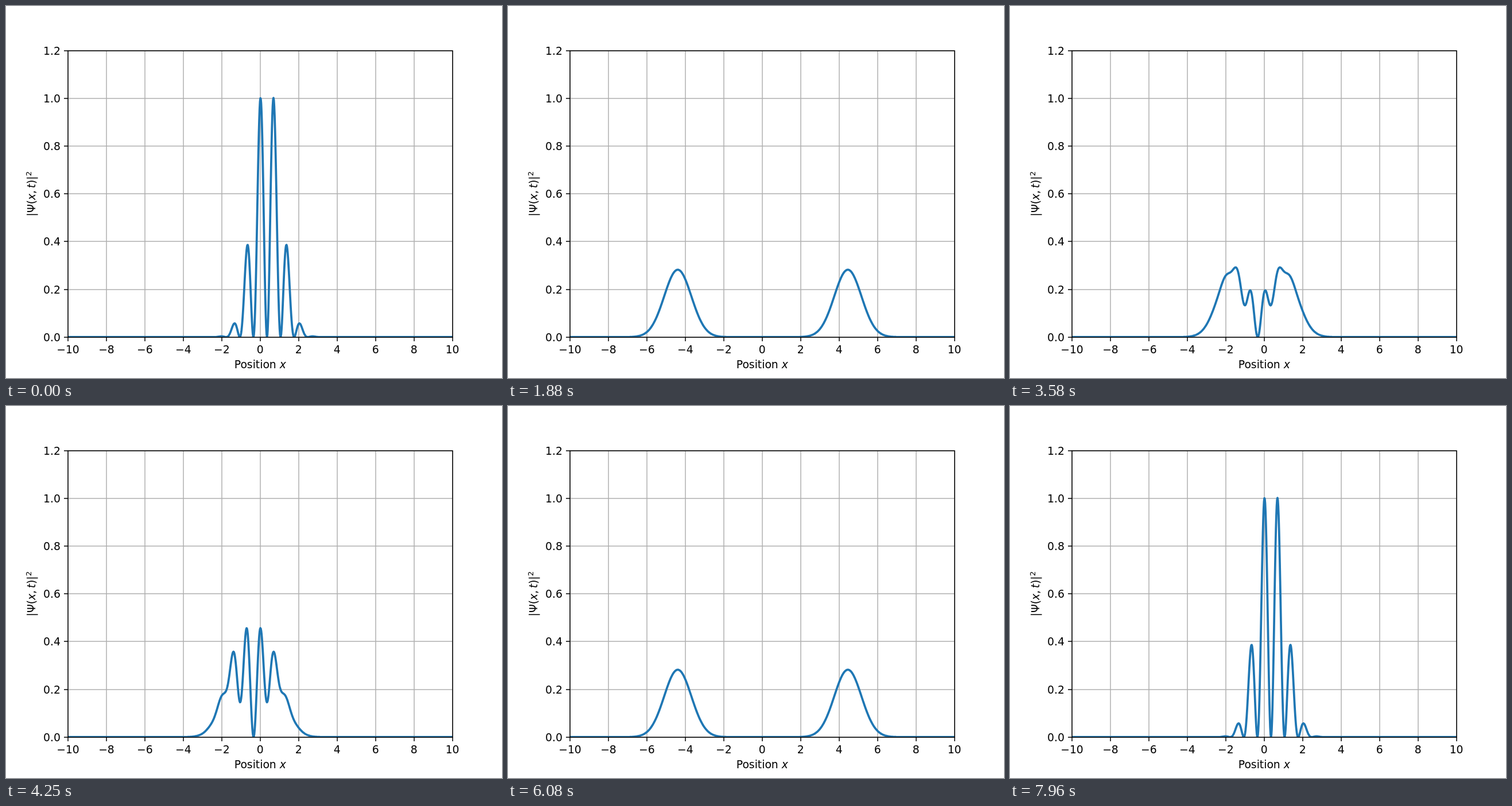
Write an HTML page that moves like this. It is 864 px wide and 648 px high and loops after 8000 ms.

```html
<!DOCTYPE html>
<html lang="en">
<head>
<meta charset="utf-8">
<title>Interfering wave packets</title>
<style>
  html, body { margin: 0; width: 100%; height: 100%; overflow: hidden; background: #fff; }
  svg { display: block; }
  text { font: 18.75px "DejaVu Sans", sans-serif; white-space: pre; }
  .mid { text-anchor: middle; }
  .end { text-anchor: end; }
  .it { font-style: italic; }
  path, rect { fill: none; stroke-width: 1.5; stroke: #000; }
  #grid { stroke: #b0b0b0; }
  #curve { stroke: #1f77b4; stroke-width: 3.75; stroke-linejoin: round; stroke-linecap: square; }
</style>
</head>
<body>
<svg width="864" height="648" viewBox="0 0 864 648">
  <clipPath id="area"><path d="M108 78H778V577H108Z"/></clipPath>
  <path id="grid"/>
  <path id="curve" clip-path="url(#area)"/>
  <path id="ticks"/>
  <rect x="108" y="78" width="670" height="499"/>
  <g id="labels"></g>
  <text class="mid" x="442.8" y="631">Position <tspan class="it">x</tspan></text>
  <text class="mid" transform="translate(51 327.2) rotate(-90)">|Ψ(<tspan class="it">x</tspan>,<tspan class="it" dx="3.65">t</tspan>)|<tspan dy="-7.2" font-size="13.125" style="font-size:13.125px">2</tspan></text>
</svg>
<script>
const el = id => document.getElementById(id);
const px = x => 442.8 + x * 33.48;
const py = y => 576.72 - y * 415.8;

let grid = '', ticks = '', labels = '';
for (let v = -10; v <= 10; v += 2) {
  const x = Math.round(px(v));
  grid += `M${x} 78V577`;
  ticks += `M${x} 577v7`;
  labels += `<text class="mid" x="${px(v)}" y="605">${String(v).replace('-', '\u2212')}</text>`;
}
for (let i = 0; i <= 6; i++) {
  const y = Math.round(py(i / 5));
  grid += `M108 ${y}H778`;
  ticks += `M108 ${y}h-7`;
  labels += `<text class="end" x="94.9" y="${y + 7}">${(i / 5).toFixed(1)}</text>`;
}
el('grid').setAttribute('d', grid);
el('ticks').setAttribute('d', ticks);
el('labels').innerHTML = labels;

// Two coherent oscillator states, alpha = 1/4 ± iπ, in an odd superposition
const STEPS = 192, POINTS = 1000;
function density(x, phase) {
  const u = x - Math.SQRT2 / 4 * Math.cos(phase);
  const d = Math.SQRT2 * Math.PI * Math.sin(phase);
  const k = 2 * Math.SQRT2 * Math.PI * Math.cos(phase);
  const fringe = 2 * Math.exp(-u * u - d * d) * Math.cos(k * u);
  return (Math.exp(-((u - d) ** 2)) + Math.exp(-((u + d) ** 2)) - fringe) / (2 * Math.sqrt(Math.PI));
}

let shown = -1;
function draw() {
  // 24 steps per second, each starting on a rounded hundredth
  const hundredths = Math.floor(performance.now() % 8000 / 10);
  const step = Math.ceil((hundredths + 0.5) * 6 / 25) - 1;
  if (step !== shown) {
    shown = step;
    const phase = 2 * Math.PI * step / (STEPS - 1);
    const pts = [];
    for (let i = 0; i < POINTS; i++) {
      const x = -10 + 20 * i / (POINTS - 1);
      pts.push(px(x).toFixed(2) + ' ' + py(density(x, phase)).toFixed(2));
    }
    el('curve').setAttribute('d', 'M' + pts.join('L'));
  }
  requestAnimationFrame(draw);
}
draw();
</script>
</body>
</html>
```
